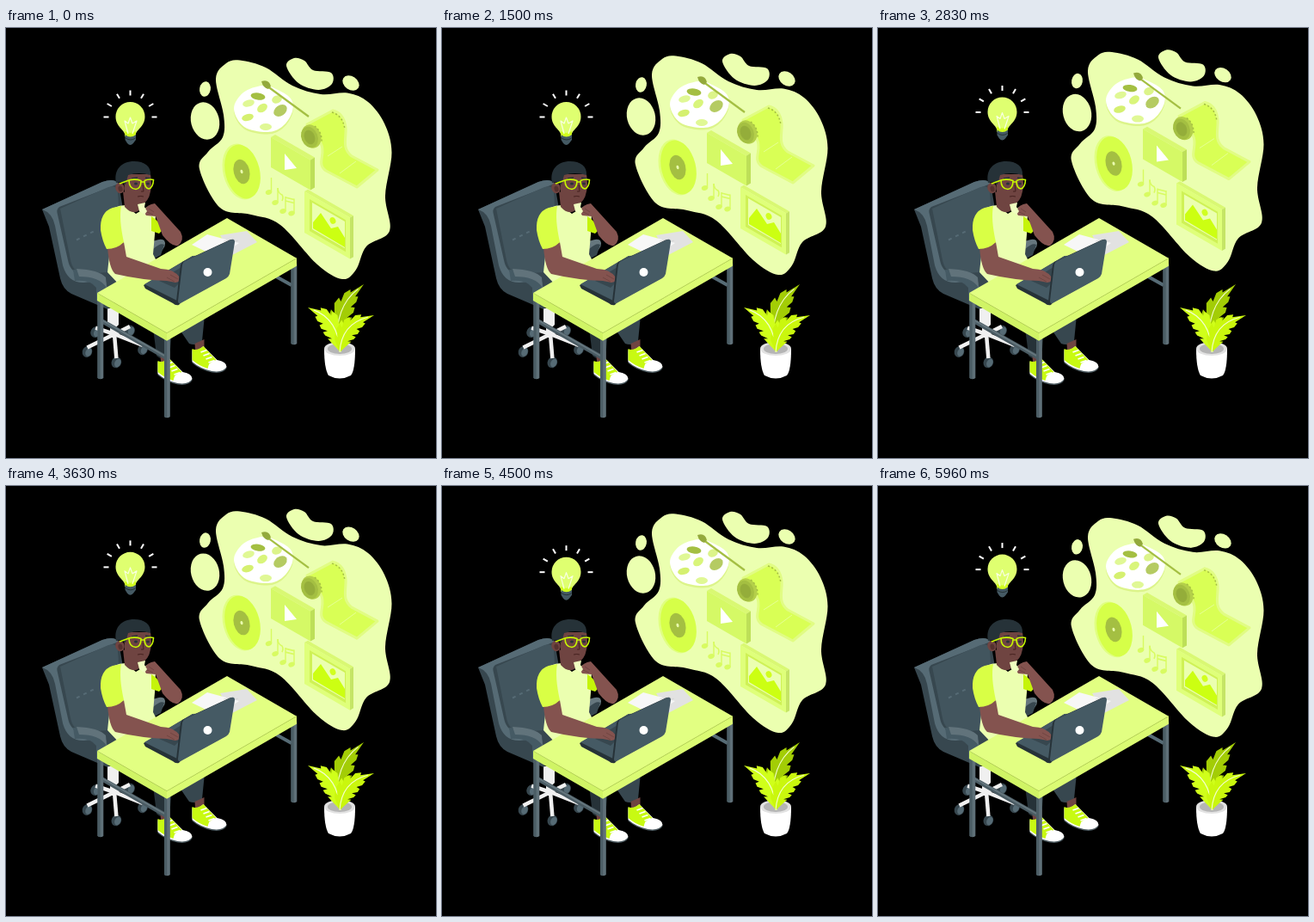
An HTML page with a canvas for the animation above (6 s loop, 500x500 px).

```html
<!DOCTYPE html>
<html lang="en">
<head>
<meta charset="utf-8">
<title>Creative thinking</title>
<style>
html, body { margin: 0; width: 100%; height: 100%; overflow: hidden; background: #000; }
canvas { display: block; width: 500px; height: 500px; }
</style>
</head>
<body>
<canvas id="stage"></canvas>
<script>
const canvas = document.getElementById('stage');
const ctx = canvas.getContext('2d');
const ratio = window.devicePixelRatio || 1;
canvas.width = canvas.height = Math.round(500 * ratio);

const LOOP = 6000, RISE = 10, ISO = 0.576, RAD = Math.PI / 180;
const LIME = '#d1ff1f', SOFT = '#d8fb61', PALE = '#ebffb0', DESK = '#e2ff82', OLIVE = '#a4bf42';
const SLATE = '#37474f', STEEL = '#455a64', METAL = '#566b75', INK = '#263238';
const SKIN = '#84534f', FACE = '#6f4441', WHITE = '#fff';

function fill(d, color) {
  ctx.fillStyle = color;
  ctx.fill(new Path2D(d));
}

function line(d, color, width = 1) {
  ctx.strokeStyle = color;
  ctx.lineWidth = width;
  ctx.stroke(new Path2D(d));
}

function dashed(d, color, width, dash) {
  ctx.setLineDash(dash);
  line(d, color, width);
  ctx.setLineDash([]);
}

function oval(x, y, rx, ry, color, deg = 0) {
  ctx.fillStyle = color;
  ctx.beginPath();
  ctx.ellipse(x, y, rx, ry, deg * RAD, 0, 7);
  ctx.fill();
}

function moved(x, y, draw) {
  ctx.save();
  ctx.translate(x, y);
  draw();
  ctx.restore();
}

// Closed smooth curve through "x y, x y, ..."
function smooth(text, color) {
  const pts = text.split(', ').map(p => p.split(' ').map(Number)), n = pts.length;
  const at = i => pts[(i + n) % n];
  ctx.beginPath();
  ctx.moveTo(...pts[0]);
  for (let i = 0; i < n; i++) {
    const [a, b, c, d] = [at(i - 1), at(i), at(i + 1), at(i + 2)];
    ctx.bezierCurveTo(
      b[0] + (c[0] - a[0]) / 6, b[1] + (c[1] - a[1]) / 6,
      c[0] - (d[0] - b[0]) / 6, c[1] - (d[1] - b[1]) / 6, c[0], c[1]);
  }
  ctx.fillStyle = color;
  ctx.fill();
}

// Parallelogram standing on the isometric x axis
function panel(x, y, w, h, color, slope = ISO) {
  fill(`M${x} ${y}l${w} ${w * slope}v${h}l${-w} ${-w * slope}Z`, color);
}

// Isometric box: x, y is the upper left corner of its front face
function box(x, y, w, depth, h, top, face, side) {
  fill(`M${x} ${y}l${depth} ${-depth * ISO}l${w} ${w * ISO}l${-depth} ${depth * ISO}Z`, top);
  panel(x, y, w, h, face);
  panel(x + w, y + w * ISO, depth, h, side, -ISO);
}

function palette() {
  const outline = '265 94, 276 75, 298 67, 314 71, 331 82, 333 97, 322 114, 304 121, 277 115';
  moved(0, 2.5, () => smooth(outline, '#dcf48a'));
  smooth(outline, WHITE);
  oval(293, 79.5, 8.5, 4, OLIVE, 8);
  oval(315, 83, 6, 4.5, '#dcf48a', -20);
  oval(319, 96, 8.5, 6, '#b5cb62', -35);
  oval(282, 87.5, 7, 4, '#e0f895', -15);
  oval(298, 93, 6.5, 4.5, '#d9f57b', -35);
  oval(281, 104, 7, 4, '#d5f070', -15);
  oval(302, 115, 7, 4, '#e0f895');
  line('M305 68.5L352 103', OLIVE, 2.2);
  fill('M297 62Q306 59 308 68L305 71Q299 70 297 62Z', '#93a93c');
}

function film() {
  const strip = 'M366 134C373 146 360 158 372 166L408 185L432 165L402 149C390 140 396 128 395 116Q393 99 380 96L350 112Z';
  fill(strip, '#d9ff55');
  line(strip, '#e1fc84', 3);
  line('M374 149L391 138M388 169L407 155', '#e6ff95', 1);
  dashed('M379 98Q392 102 394 118', OLIVE, 1.5, [2, 2.5]);
  oval(355, 126, 11, 14, '#b4cf4a', -22);
  oval(353, 127, 9.5, 12.5, OLIVE, -22);
  oval(353, 127, 6, 8.5, '#94ad3a', -22);
  dashed('M359 114Q368 121 367 134', OLIVE, 1.5, [2, 2.5]);
}

function notes() {
  for (const [x, y] of [[305.5, 191], [313, 203], [322, 213], [332, 215.5]]) {
    oval(x, y, 3.8, 2.8, SOFT, -20);
    line(`M${x + 3} ${y}v-17`, SOFT, 1.4);
  }
  line('M316 186Q316 192 321 194Q323 197 321 201M325 197L335 199.5M325 201L335 203.5', SOFT, 1.6);
}

function record() {
  oval(273, 167, 20.5, 33, '#e0ff80', -14);
  oval(275, 167, 20, 32, '#d6ff48', -14);
  oval(274, 167, 9.2, 14.5, OLIVE, -14);
  oval(274, 167, 1.5, 2.2, PALE, -14);
}

function video() {
  box(308, 127, 46, 5, 35, '#d9f873', '#d5f966', '#bddf58');
  fill('M324 146L338 163L324 165Z', WHITE);
}

function picture() {
  box(347, 190, 53, 4, 48, '#d9f873', '#dfff7a', '#c5e566');
  panel(353, 199, 42, 37, '#cff156');
  panel(356, 203, 38, 31, PALE);
  oval(380, 224, 3.3, 4, LIME, -25);
  fill('M357 233V226L366 215L378 233L386 231L394 244V255Z', '#ccff12');
}

function thought() {
  smooth('244 59, 256 41, 272 37.5, 302 46, 333 67, 366 77, 397 75.5, 421 86, 440 111, 448.5 145, 441 195, 446 236, 419 254, 407 281, 391 292, 362 275, 319 229, 285 217, 249 209, 225 164, 235 144, 252 127, 253 101', PALE);
  smooth('326 44, 335 35, 347 38, 357 49, 378 52, 379 65, 363 72, 340 64', PALE);
  oval(401, 64, 10.5, 7.7, PALE, 34);
  oval(231.5, 108, 16.4, 22, PALE, -14);
  oval(231.5, 71, 6.4, 8.8, PALE, 10);
  record();
  video();
  notes();
  picture();
  palette();
  film();
}

function bulb() {
  for (let deg = 180; deg <= 360; deg += 30) {
    const c = Math.cos(deg * RAD), s = Math.sin(deg * RAD);
    line(`M${144.5 + 25 * c} ${103.5 + 25 * s}L${144.5 + 31 * c} ${103.5 + 31 * s}`, WHITE, 2);
  }
  fill('M138.5 125C138 118 127.5 115 127.5 103A17 17 0 0 1 161.5 103C161.5 115 151 118 150.5 125Z', '#dfff70');
  fill('M138 120Q144.5 124 151 120V126Q144.5 129 138 126Z', LIME);
  line('M142 123L138 108L142 111L144.5 104L147 111L152 108L147 123', '#f8ffe0', 1.2);
  fill('M138.5 124Q144.5 129 151 124V130L148 134Q144.5 138 141 134L138.5 130Z', STEEL);
  line('M139 128Q145 132 150.5 128', INK);
}

function wheels() {
  for (let k = 0; k < 5; k++) {
    const deg = 230 + 72 * k;
    const x = 126 + 34 * Math.cos(deg * RAD), y = 368 + 20 * Math.sin(deg * RAD);
    oval(x, y + 1, 5.7, 6.5, SLATE, 25);
    oval(x + 1.5, y + 1.5, 3.4, 5, METAL, 25);
    line(`M126 356L${x} ${y - 4}`, '#f0f0f0', 4.5);
  }
  fill('M118 326H131V345L128 348V360H121V348L118 345Z', '#f0f0f0');
}

function chair() {
  wheels();
  fill('M42 211L112 179Q126 174 131 181L136 210L150 292L118 327L76 309Q66 304 63 291L50 231Z', SLATE);
  fill('M42 211L112 179Q126 174 131 181L62 208Q58 211 60 217L72 270Q75 286 92 288Q110 287 117 297L116 303Q108 293 91 296Q72 297 66 276L57 230Q54 215 42 211Z', METAL);
  fill('M63 210L119 185Q128 182 130 190L133 240L118 284L92 286Q78 285 75 270Z', '#42555e');
  dashed('M82 246.5L103 236', METAL, 2, [4, 5]);
  fill('M165 252Q178 243 184 247Q188 253 178 262L164 273Z', '#66777e');
  fill('M171 257Q180 249 184 252L180 264L165 272Z', SLATE);
}

function shoe(x, y) {
  const sole = 'M0 2Q5 5 13 -2L29 14Q40 16 40 22Q36 29 23 27Q9 24 0 16Z';
  moved(x, y, () => {
    fill('M3 -5L14 -10V5L4 8Z', FACE);
    moved(0, 1.5, () => fill(sole, '#4c5a60'));
    fill(sole, WHITE);
    fill('M0 1Q5 4 13 -2L28 14Q19 16 18 24Q8 21 0 14Z', '#c8fa12');
    for (let k = 0; k < 4; k++) line(`M${10 + 3 * k} ${5 + 4 * k}l7 -2.5`, WHITE, 1.8);
  });
}

function legs() {
  fill('M170 340L193 348L190 386Q181 387 175 381Z', INK);
  fill('M200 348L231 334L228 364Q221 370 213 367Z', SLATE);
  shoe(176.5, 386);
  shoe(216.5, 372);
}

function head() {
  fill('M136 190L157 199L155 212Q147 218 138 208Z', FACE);
  fill('M137 170H168Q170 183 168 190Q166 202 157 206Q145 204 138 192Z', FACE);
  oval(132.5, 186, 5.2, 6.2, FACE, -15);
  oval(133, 187, 2.5, 3.4, '#55312f', -15);
  fill('M128 180C125 165 134 155 149 155C161 155 169 161 168 171Q154 167 142 171L139 182L134 179Z', INK);
  line('M146 175L153 174M162 174L168 175', INK, 1.4);
  oval(151, 181, 2, 1.5, INK);
  oval(165, 181, 1.8, 1.5, INK);
  line('M159 182L160 190H157M153 196Q157 195 160 196', '#45211f');
  line('M132 181L143 177Q150 175 157 177.5Q157 187 151 187.5Q143 187 143 177M157 179H161M161 177.5Q166 175 171.5 176.5Q171 186 166 187Q161 186 161 177.5', '#c8f800', 1.6);
}

function person() {
  fill('M126 209Q132 206 139 206L151 216L166 207L174 215L173 240L171 263L185 290L135 302L118 284Z', PALE);
  head();
  fill('M169 219Q178 224 182 235L178 239L169 236Z', '#c5f40a');
  fill('M160 213Q164 205 173 204L203 237Q208 247 200 253Q193 255 182 241L174 219L163 218Z', SKIN);
  line('M166 210L172 214M164 214L171 217', FACE);
  fill('M153 205L162 203L161 208L164 213L161 217L155 213Z', '#f0ffc0');
}

function armrest() {
  fill('M78 281Q103 281 114 290Q119 296 118 324L105 317V302Q98 292 80 294Z', STEEL);
  fill('M82 280Q108 281 116 290L117 302Q109 289 85 289Z', '#61737b');
}

function desk() {
  line('M314 289L332 299', METAL, 4);
  line('M112 341L186 383', '#4a5b63', 5);
  line('M112 340L186 382', '#66777e', 2);
  for (const [x, y] of [[106.5, 314], [184, 359], [331.5, 274]]) {
    fill(`M${x} ${y}h6.8v93q-3.4 2.5 -6.8 0Z`, '#5f7078');
    fill(`M${x} ${y}h3.2v94q-2 0 -3.2 -1Z`, '#4b5d65');
  }
  box(106, 308, 81, 151, 9, DESK, '#d0f465', '#dbfb73');
  line('M106 308.3L187 354.6L338 267.6', '#bfdd5c', .8);
}

function papers() {
  fill('M249 241L280 236L292 249L263 264Z', '#e2e2e2');
  fill('M216 252L234 240L271 250L247 267Z', '#f7f7f7');
  line('M253 248L265 245M256 251L270 247', '#d5d5d5', .8);
}

function laptop() {
  const lid = 'M208 271L262 246Q266 245 266 249L260 286Q259 289 256 291L203 320Q200 321 200 317L205 275Q206 272 208 271Z';
  fill('M160 299L217 265L250 264L201 322Q197 323 194 320L162 303Z', INK);
  fill('M161 298L217 265L248 264L201 318Z', STEEL);
  fill('M178 294L212 273L222 277L196 302Z', SLATE);
  fill('M118 255Q127 256 137 249L140 266L180 280Q195 280 202 290Q204 295 197 296L187 294Q157 293 127 286Q120 280 118 255Z', SKIN);
  line('M191 287L200 292M187 290L196 295', FACE, .9);
  moved(-2, .5, () => fill(lid, INK));
  fill(lid, STEEL);
  oval(234.5, 284, 5, 5, WHITE);
}

function sleeve() {
  fill('M110 235Q109 214 124 209L134 207Q131 222 137 249Q129 257 117 257Q112 248 110 235Z', '#d9ff45');
}

// Notched leaf grown along a quadratic midrib
function leaf(base, bend, tip, width, color) {
  const point = (u, off) => {
    const v = 1 - u;
    const [x, y] = [0, 1].map(i => v * v * base[i] + 2 * u * v * bend[i] + u * u * tip[i]);
    const [dx, dy] = [0, 1].map(i => v * (bend[i] - base[i]) + u * (tip[i] - bend[i]));
    const len = Math.hypot(dx, dy);
    return [x - dy / len * off, y + dx / len * off];
  };
  const reach = u => width * Math.sin(Math.PI * u ** 0.85);
  const edge = side => {
    const pts = [];
    for (let k = 1; k < 5; k++) {
      const u = 0.1 + k * 0.18;
      pts.push(point(u - 0.09, side * reach(u - 0.09)), point(u, side * reach(u)), point(u - 0.03, side * reach(u) * 0.6));
    }
    return pts;
  };
  fill('M' + [base, ...edge(-1), tip, ...edge(1).reverse()].join('L') + 'Z', color);
  line(`M${base}Q${bend} ${point(0.9, 0)}`, '#f4ffd0', 1.1);
}

function plant() {
  leaf([385, 370], [382, 324], [416, 298], 13, '#a3cd05');
  fill('M370 373H406Q406 398 401 404Q388 411 375 404Q370 396 370 373Z', WHITE);
  oval(388, 373, 18, 8, '#e2e2e2');
  oval(388, 373, 14, 6, '#b5b5b5');
  leaf([389, 377], [386, 338], [351, 325], 13, '#d0ff1a');
  leaf([388, 377], [390, 344], [428, 334], 12, '#caf70d');
}

// Triangle wave: 0 up to 1 and back over one unit
const wave = x => 1 - Math.abs(1 - 2 * (x % 1));

function draw(t) {
  ctx.setTransform(ratio, 0, 0, ratio, 0, 0);
  ctx.fillStyle = '#000';
  ctx.fillRect(0, 0, 500, 500);
  ctx.lineJoin = 'round';

  moved(0, -RISE * wave(t / LOOP), thought);
  moved(0, t < 2000 ? 0 : -RISE * wave((t - 2000) / 3000), bulb);
  chair();
  legs();
  person();
  armrest();
  desk();
  papers();
  laptop();
  sleeve();
  plant();
}

const start = performance.now();
function tick() {
  draw((performance.now() - start) % LOOP);
  requestAnimationFrame(tick);
}
tick();
</script>
</body>
</html>
```
